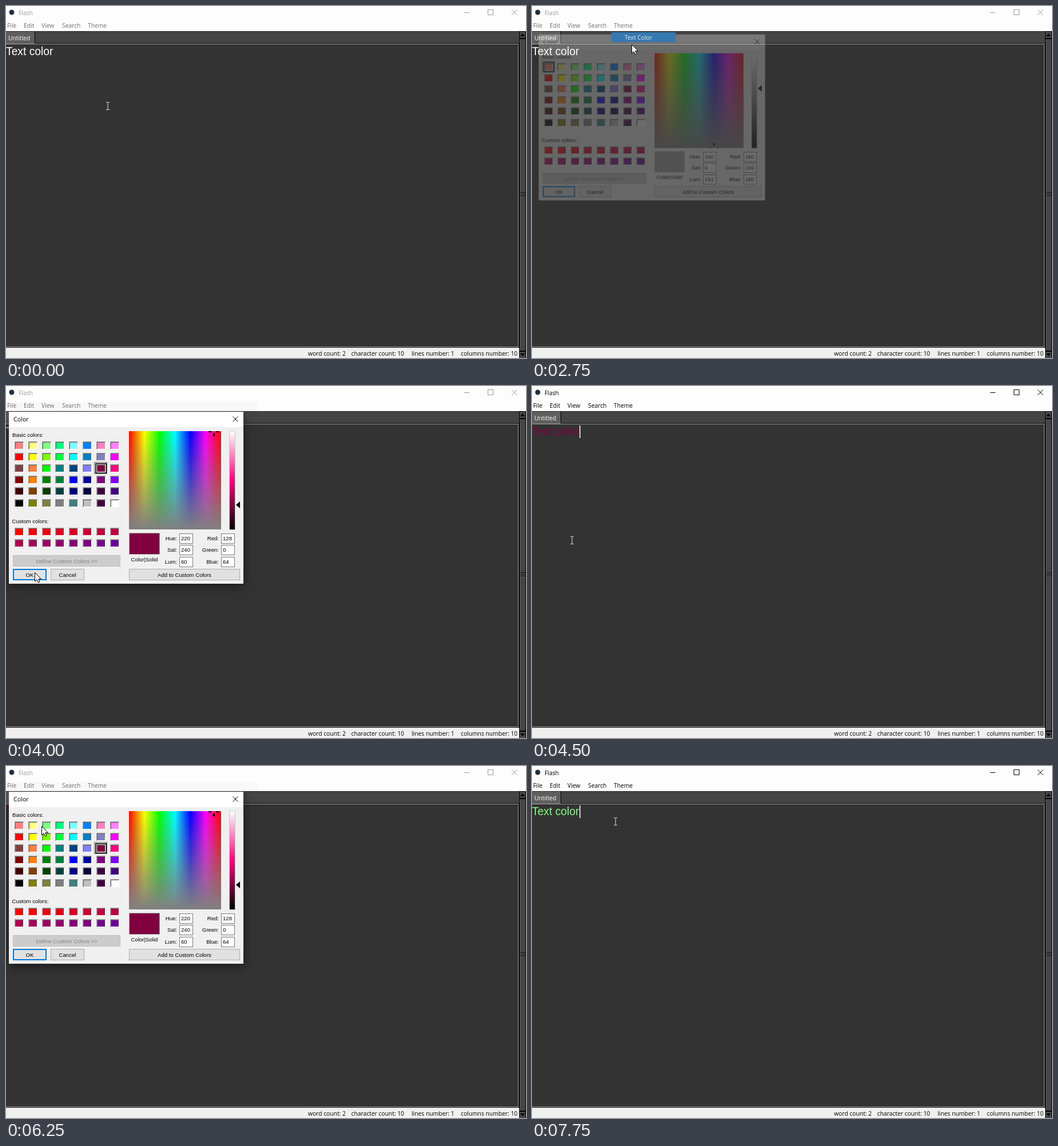
An HTML page with a canvas for the animation above (8 s loop, 909 px wide and 616 px high).

```html
<!DOCTYPE html>
<html lang="en">
<head>
<meta charset="utf-8">
<title>Text editor</title>
<style>
html, body { margin: 0; width: 100%; height: 100%; overflow: hidden; background: #333; }
canvas { display: block; }
</style>
</head>
<body>
<canvas id="stage" width="909" height="616"></canvas>
<script>
const W = 909, H = 616, LOOP = 8000;
const UI = '10.3px "Open Sans", "Noto Sans", sans-serif';
const TITLE = '10.7px "Open Sans", "Noto Sans", sans-serif';
const DLG = '9.6px "Liberation Sans", Arial, sans-serif';
const EDIT = '19.3px "Liberation Sans", Arial, sans-serif';

const screen = document.getElementById('stage').getContext('2d');
const layer = document.createElement('canvas');
layer.width = W;
layer.height = H;
const layerCtx = layer.getContext('2d');
let c = screen;

const BASIC = [
  'ff8080 ffff80 80ff80 00ff80 80ffff 0080ff ff80c0 ff80ff',
  'ff0000 ffff00 80ff00 00ff40 00ffff 0080c0 8080c0 ff00ff',
  '804040 ff8040 00ff00 008080 004080 8080ff 800040 ff0080',
  '800000 ff8000 008000 008040 0000ff 0000a0 800080 8000ff',
  '400000 804000 004000 004040 000080 000040 400040 400080',
  '000000 808000 808040 808080 408080 c0c0c0 400040 ffffff'
].map(row => row.split(' ').map(hex => '#' + hex));

const GREY = { rgb: [160, 160, 160], hsl: [160, 0, 151], col: 0, row: 0 };
const MAROON = { rgb: [128, 0, 64], hsl: [220, 240, 60], col: 6, row: 2 };
const GREEN = { rgb: [128, 255, 128], hsl: [80, 240, 180], col: 2, row: 0 };

// Each step changes only the named properties; the rest carries over.
const STEPS = [
  [0, { ptr: 'beam', x: 178, y: 175, active: false, menu: '', dlg: 0, text: '#ffffff', pick: GREY, linger: false }],
  [250, { x: 168, y: 114 }],
  [750, { x: 160, y: 88 }],
  [1000, { ptr: 'arrow', x: 157, y: 39, menu: 'hover' }],
  [1250, { x: 156, active: true }],
  [1500, { menu: 'open' }],
  [2250, { x: 165, y: 53, menu: 'item' }],
  [2500, { x: 174, y: 60 }],
  [2750, { x: 174, y: 67, active: false, menu: '', dlg: 0.28, linger: true }],
  [3000, { x: 174, y: 98, dlg: 1, linger: false }],
  [3250, { x: 167, y: 140 }],
  [3500, { pick: MAROON }],
  [3750, { x: 105, y: 245 }],
  [4000, { x: 50, y: 326 }],
  [4250, { active: true, dlg: 0.28, text: '#800040' }],
  [4500, { ptr: 'beam', x: 70, y: 270, dlg: 0 }],
  [4750, { x: 122, y: 140 }],
  [5000, { ptr: 'arrow', x: 158, y: 38, menu: 'hover' }],
  [5250, { menu: 'open' }],
  [5500, { x: 170, y: 57, menu: 'item' }],
  [6000, { x: 140, y: 72, active: false, menu: '', dlg: 0.28, linger: true }],
  [6250, { x: 62, y: 105, dlg: 1, linger: false }],
  [6500, { x: 68, y: 102, pick: GREEN }],
  [6750, { x: 57, y: 230 }],
  [7000, { x: 46, y: 327 }],
  [7250, { active: true, dlg: 0.28, text: '#80ff80' }],
  [7500, { ptr: 'beam', x: 110, y: 180, dlg: 0 }],
  [7750, { x: 146, y: 97 }]
];

function stateAt(t) {
  const s = {};
  for (const [at, change] of STEPS) if (at <= t) Object.assign(s, change);
  return s;
}

function box(x, y, w, h, fill) {
  c.fillStyle = fill;
  c.fillRect(x, y, w, h);
}

function frame(x, y, w, h, fill, edge, line = 1) {
  box(x, y, w, h, edge);
  box(x + line, y + line, w - 2 * line, h - 2 * line, fill);
}

function label(str, x, y, color = '#000', font = UI, align = 'left') {
  c.font = font;
  c.fillStyle = color;
  c.textAlign = align;
  c.fillText(str, x, y);
}

function shape(points, fill, stroke) {
  c.beginPath();
  points.forEach(([x, y]) => c.lineTo(x, y));
  c.closePath();
  if (fill) { c.fillStyle = fill; c.fill(); }
  if (stroke) { c.strokeStyle = stroke; c.lineWidth = 1; c.stroke(); }
}

function cross(x, y, size, color) {
  c.strokeStyle = color;
  c.lineWidth = 1;
  c.beginPath();
  c.moveTo(x, y);
  c.lineTo(x + size, y + size);
  c.moveTo(x + size, y);
  c.lineTo(x, y + size);
  c.stroke();
}

function ramp(x0, y0, x1, y1, colors) {
  const g = c.createLinearGradient(x0, y0, x1, y1);
  colors.forEach((color, i) => g.addColorStop(i / (colors.length - 1), color));
  return g;
}

function titleBar(s) {
  const ink = s.active ? '#000' : '#999';
  box(0, 0, W, 44, '#fdfdfd');
  if (s.menu === 'open' || s.menu === 'item') box(131, 14, 133, 30, '#f9f9f9');
  if (s.dlg === 1) box(0, 28, 440, 16, '#f8f8f8');
  c.fillStyle = '#1d3140';
  c.beginPath();
  c.arc(10, 11, 4.5, 0, 7);
  c.fill();
  label('Flash', 22, 15.5, ink);
  box(801, 11, 9, 1, ink);
  c.strokeStyle = ink;
  c.lineWidth = 1;
  c.strokeRect(842.5, 6.5, 9, 9);
  cross(884, 6.5, 9.5, ink);
  if (s.menu) frame(137, 26, 46, 18, '#cce8ff', '#99d1ff');
  const names = { File: 2, Edit: 31, View: 62, Search: 98, Theme: 143 };
  for (const name in names) label(name, names[name], 38, s.active ? '#000' : '#6d6d6d');
}

function scrollBar() {
  box(897, 44, 12, 572, '#000');
  box(898, 45, 10, 11, '#484848');
  box(898, 58, 10, 545, '#464646');
  box(898, 605, 10, 11, '#484848');
  box(898, 58, 1, 545, '#5a5a5a');
  shape([[899, 53], [907, 53], [903, 48]], '#000');
  shape([[899, 608], [907, 608], [903, 613]], '#000');
  for (let y = 326; y < 335; y += 3) {
    box(899, y, 9, 1, '#000');
    box(899, y + 1, 9, 1, '#626262');
  }
}

function editor(s) {
  box(0, 44, 897, 22, '#454545');
  box(0, 44, 897, 1, '#222');
  box(0, 65, 897, 1, '#000');
  box(0, 45, 50, 21, '#5f5f5f');
  box(50, 44, 1, 22, '#000');
  label('Untitled', 4, 59.5, '#fff');
  box(0, 66, 897, 532, '#000');
  box(0, 66, 896, 531, '#aaa');
  box(0, 67, 895, 529, '#333');
  label('Text color', 0, 86, s.text, EDIT);
  if (s.active) box(83, 69, 1.5, 22, '#fff');
  box(0, 598, 897, 18, '#f0f0f0');
  label('word count: 2', 528, 611.5);
  label('character count: 10', 603.5, 611.5);
  label('lines number: 1', 709, 611.5);
  label('columns number: 10', 795, 611.5);
  scrollBar();
}

function menu(s) {
  if (s.menu !== 'open' && s.menu !== 'item') return;
  box(141, 118, 115, 2, 'rgba(0,0,0,.45)');
  box(254, 48, 2, 70, 'rgba(0,0,0,.45)');
  frame(137, 43, 117, 75, '#f1f1f1', '#b8b8b8');
  const hot = s.menu === 'item';
  if (hot) box(139, 46, 112, 17, '#0078d7');
  label('Text Color', 162, 58.5, hot ? '#fff' : '#000');
  label('Cursor Color', 161.5, 76);
  label('"Selector" Color', 159, 93.5);
  label('Themes', 164, 111);
  shape([[241, 102.5], [241, 109.5], [245, 106]], '#000');
}

function swatch(x, y, color) {
  box(x, y, 16, 14, '#a0a0a0');
  box(x + 1, y + 1, 15, 13, '#fff');
  box(x + 1, y + 1, 14, 12, '#696969');
  box(x + 2, y + 2, 13, 11, color);
}

function swatches(pick) {
  const colX = i => Math.round(15 + i * 23.8);
  const rowY = j => Math.round(96.5 + j * 20.2);
  const px = colX(pick.col), py = rowY(pick.row);
  c.strokeStyle = '#000';
  c.lineWidth = 1;
  c.setLineDash([1, 1]);
  c.strokeRect(px - 3.5, py - 3.5, 22, 20);
  c.setLineDash([]);
  frame(px - 2, py - 2, 20, 18, '#f0f0f0', '#000', 1.5);
  BASIC.forEach((row, j) => row.forEach((color, i) => swatch(colX(i), rowY(j), color)));
  for (let i = 0; i < 16; i++) {
    swatch(colX(i % 8), i < 8 ? 248 : 268, `rgb(${255 - 10 * i},0,${10 * i})`);
  }
}

function spectrum([hue, sat, lum]) {
  const x = 215, y = 79, w = 161, h = 172;
  box(x, y, w, h, ramp(x, 0, x + w, 0, ['#f00', '#ff0', '#0f0', '#0ff', '#00f', '#f0f', '#f00']));
  box(x, y, w, h, ramp(0, y, 0, y + h, ['rgba(128,128,128,0)', 'rgb(128,128,128)']));
  c.save();
  c.beginPath();
  c.rect(x, y, w, h);
  c.clip();
  const mx = Math.round(x + w * hue / 240), my = Math.round(y + h * (1 - sat / 240));
  box(mx - 9, my - 1, 5, 3, '#000');
  box(mx + 4, my - 1, 5, 3, '#000');
  box(mx - 1, my - 9, 3, 5, '#000');
  box(mx - 1, my + 4, 3, 5, '#000');
  c.restore();
  const pure = `hsl(${hue * 1.5},${sat / 2.4}%,50%)`;
  frame(390, 78, 11, 174, '#fff', '#c8c8c8');
  box(391, y, 9, h, ramp(0, y, 0, y + h, ['#fff', pure, '#000']));
  const ay = y + h * (1 - lum / 240);
  shape([[402, ay], [409, ay - 6], [409, ay + 6]], '#000');
}

function button(str, x, y, w, kind) {
  const off = kind === 'off', main = kind === 'main';
  frame(x, y, w, 20, off ? '#cccccc' : '#e1e1e1', off ? '#bfbfbf' : main ? '#0078d7' : '#adadad', main ? 2 : 1);
  label(str, x + w / 2, y + 13.5, off ? '#838383' : '#000', DLG, 'center');
}

function field(name, value, x, row) {
  const y = 258 + row * 20.3;
  label(name, x - 4, y + 12, '#000', DLG, 'right');
  frame(x, Math.round(y), 24, 18, '#fff', '#7a7a7a');
  label(value, x + 3, y + 12, '#000', DLG);
}

function dialogBody(pick) {
  box(5, 45, 410, 301, '#f0f0f0');
  box(5, 45, 410, 27, '#fff');
  label('Color', 13, 62, '#000', TITLE);
  cross(396.5, 53.5, 9, '#000');
  label('Basic colors:', 11, 89, '#000', DLG);
  label('Custom colors:', 10.5, 240, '#000', DLG);
  swatches(pick);
  spectrum(pick.hsl);
  frame(215, 257, 54, 38, `rgb(${pick.rgb})`, '#a0a0a0');
  label('Color|Solid', 242, 306.5, '#000', DLG, 'center');
  ['Hue:', 'Sat:', 'Lum:'].forEach((name, i) => field(name, pick.hsl[i], 303, i));
  ['Red:', 'Green:', 'Blue:'].forEach((name, i) => field(name, pick.rgb[i], 376, i));
  button('Define Custom Colors >>', 12, 296, 188, 'off');
  button('OK', 12, 320, 59, 'main');
  button('Cancel', 78, 320, 59);
  button('Add to Custom Colors', 215, 320, 194);
}

function dialog(s) {
  if (!s.dlg) return;
  c = layerCtx;
  c.clearRect(0, 0, W, H);
  dialogBody(s.pick);
  c = screen;
  c.save();
  if (s.dlg === 1) {
    c.save();
    c.beginPath();
    c.rect(0, 44, W, H);
    c.clip();
    c.shadowColor = 'rgba(0,0,0,.5)';
    c.shadowBlur = 18;
    c.shadowOffsetY = 4;
    box(5, 45, 410, 301, '#222');
    c.restore();
  } else {
    const k = 0.965;
    c.translate(209.5, 195);
    c.scale(k, k);
    c.translate(-210, -195.5);
  }
  c.globalAlpha = s.dlg;
  c.drawImage(layer, 0, 0);
  c.restore();
}

function lingeringItem(s) {
  if (!s.linger) return;
  box(139, 46, 112, 17, '#3678b0');
  label('Text Color', 162, 58.5, '#e4edf5');
}

function pointer({ ptr, x, y }) {
  if (ptr === 'beam') {
    box(x - 0.5, y - 6, 1, 13, '#e8e8e8');
    for (const dy of [-7, 6]) {
      box(x - 3, y + dy, 2.5, 1, '#e8e8e8');
      box(x + 0.5, y + dy, 2.5, 1, '#e8e8e8');
    }
    return;
  }
  const outline = [[0, 0], [0, 15.5], [3.6, 12.2], [6, 17.5], [8.4, 16.4], [6.2, 11.3], [11, 11.3]];
  shape(outline.map(([dx, dy]) => [x + 0.5 + dx, y + 0.5 + dy]), '#fff', '#000');
}

function draw(t) {
  const s = stateAt(t);
  titleBar(s);
  editor(s);
  menu(s);
  dialog(s);
  lingeringItem(s);
  pointer(s);
}

const start = performance.now();
function tick() {
  draw((performance.now() - start) % LOOP);
  requestAnimationFrame(tick);
}
tick();
</script>
</body>
</html>
```
